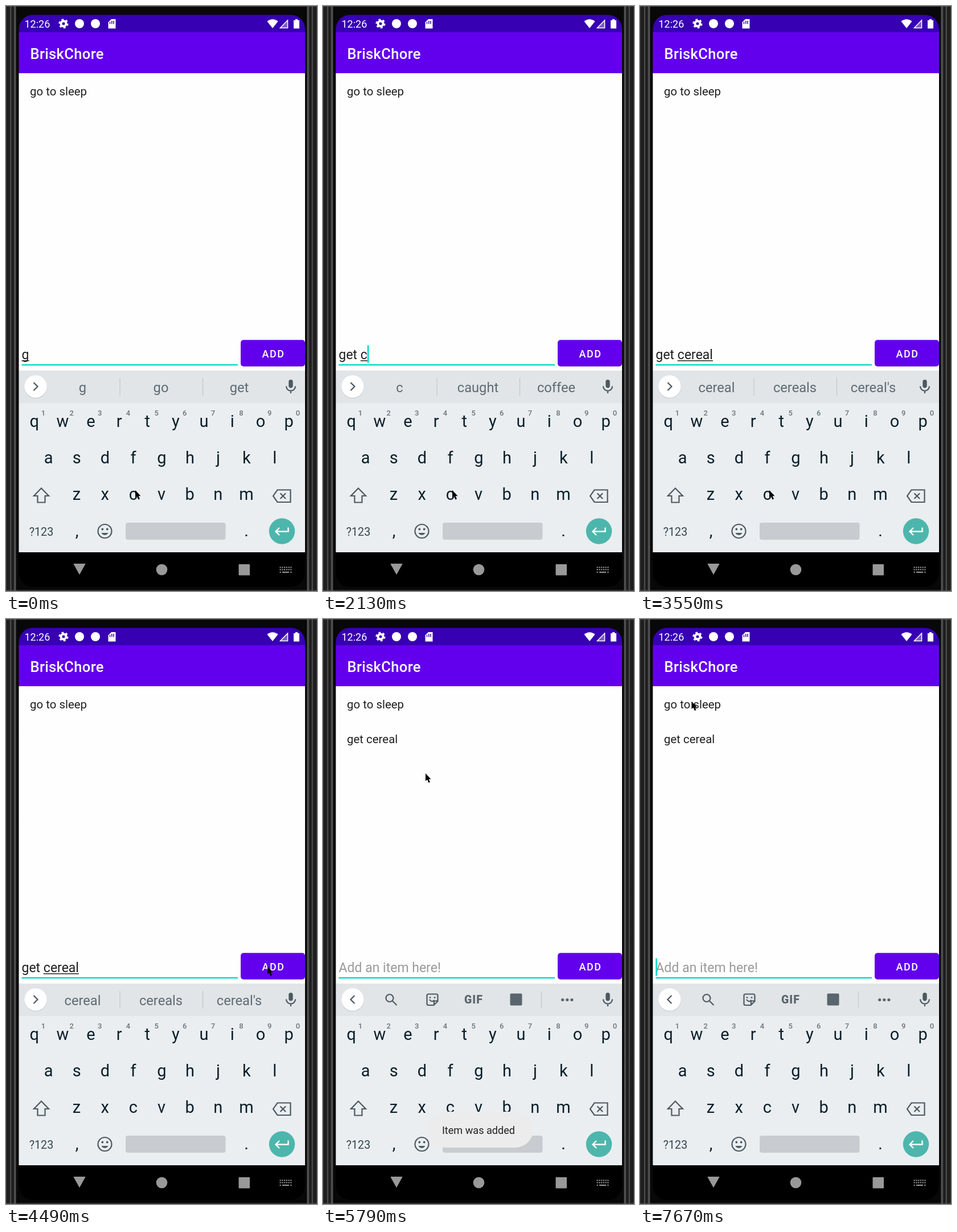
An HTML page for the animation above (8 s loop, 546x1027 px).

```html
<!DOCTYPE html>
<html lang="en">
<head>
<meta charset="utf-8">
<title>To-do list</title>
<style>
  html, body { margin: 0; width: 100%; height: 100%; overflow: hidden; background: #000; }
  svg { display: block; width: 100%; height: 100%; }
  text { font-family: Roboto, sans-serif; white-space: pre; }
  .mid { text-anchor: middle; }
  .line { fill: none; stroke: #4d5960; stroke-width: 2.2; }
</style>
</head>
<body>
<svg viewBox="0 0 546 1027">
  <defs>
    <linearGradient id="edge">
      <stop offset="0" stop-color="#444"/><stop offset=".08" stop-color="#1c1c1c"/>
      <stop offset=".34" stop-color="#222"/><stop offset=".42" stop-color="#5c5c5c"/>
      <stop offset=".5" stop-color="#161616"/><stop offset=".7" stop-color="#2a2a2a"/>
      <stop offset=".8" stop-color="#6a6a6a"/><stop offset=".9" stop-color="#111"/>
      <stop offset="1" stop-color="#050505"/>
    </linearGradient>
    <clipPath id="screen"><rect x="22.5" y="15.4" width="502.5" height="1004.6" rx="25"/></clipPath>
    <clipPath id="button"><rect x="412" y="586.300" width="113" height="46.500" rx="5"/></clipPath>
  </defs>

  <!-- phone body -->
  <rect width="546" height="1027" fill="#080808"/>
  <rect id="side" width="20" height="1027" fill="url(#edge)"/>
  <use href="#side" transform="translate(546) scale(-1 1)"/>
  <path d="M0 .7H546M0 1026H546" stroke="#555"/>

  <g clip-path="url(#screen)">
    <rect x="22" y="15" width="504" height="1005"/>
    <rect x="22" y="15" width="504" height="31" fill="#3700b3"/>
    <rect x="22" y="46" width="504" height="72" fill="#6200ee"/>
    <rect x="22" y="118" width="504" height="522" fill="#fefefe"/>
    <rect x="22" y="640" width="504" height="57" fill="#e1e5e8"/>
    <rect x="22" y="697" width="504" height="262" fill="#eaeef1"/>
  </g>

  <!-- status bar -->
  <g fill="#fff">
    <text x="32.500" y="38" font-size="18">12:26</text>
    <circle cx="101" cy="31" r="4.500" fill="none" stroke="#fff" stroke-width="4"/>
    <circle cx="101" cy="31" r="7.300" fill="none" stroke="#fff" stroke-width="2.500" stroke-dasharray="3.820"/>
    <circle cx="129" cy="31" r="8"/>
    <circle cx="157" cy="31" r="8"/>
    <path d="M185 23h7.500v16.500h-13V28.500z"/>
    <path d="M182.500 28v3.500M185.800 26v5.500M189 26v5.500" stroke="#3700b3" stroke-width="1.500"/>
    <path d="M458.500 27Q468 19.500 477.500 27L468 39z"/>
    <path d="M480.500 39L495 24V39z" opacity=".35"/>
    <path d="M481.500 38.500L494.500 25V38.500z" fill="none" stroke="#fff" stroke-width="1.500"/>
    <path d="M505 25h3v-2h4v2h3v14.500h-10z"/>
    <text x="42.500" y="92.500" font-size="25.560" font-weight="500" letter-spacing=".32">BriskChore</text>
  </g>

  <!-- list and input row -->
  <g fill="#202020" font-size="20.450">
    <text x="42" y="157">go to sleep</text>
    <text x="42" y="218.300" id="newItem">get cereal</text>
  </g>
  <rect x="27.500" y="628.800" width="379.500" height="2.400" fill="#03dac5"/>
  <text id="input" x="27.500" y="620" font-size="23"></text>
  <rect id="underline" y="622" height="1.500" fill="#222"/>
  <rect id="caret" y="595.500" width="2.600" height="31" fill="#03dac5"/>
  <g clip-path="url(#button)">
    <rect x="412" y="586" width="113" height="48" fill="#6200ee"/>
    <circle id="ripple" cx="456" cy="613" fill="#fff" opacity=".2"/>
  </g>
  <text class="mid" x="469.500" y="616.500" font-size="17.900" font-weight="500" letter-spacing="1.600" fill="#fff">ADD</text>

  <!-- suggestion strip -->
  <circle cx="52" cy="669" r="20" fill="#c9cdd0"/>
  <circle cx="52" cy="668" r="19.700" fill="#fff"/>
  <path id="chevron" class="line" d="M48.500 661l7 7l-7 7"/>
  <rect x="496.300" y="656" width="7.400" height="14.500" rx="3.700" fill="#4d5960"/>
  <path class="line" d="M492 667.500a8 8 0 0 0 16 0M500 675.500v4.500"/>
  <g id="words" class="mid" font-size="23.700" fill="#5f6b72">
    <path d="M200 653v31M345.500 653v31" stroke="#c2c7cb" stroke-width="1.200"/>
    <text x="134.500" y="678"></text><text x="272" y="678"></text><text x="409.500" y="678"></text>
  </g>
  <g id="tools" fill="#5a666d">
    <circle cx="117" cy="665.500" r="6.500" class="line"/>
    <path class="line" d="M122 670.500l7.500 7.500"/>
    <path class="line" d="M185 658.500h14q2.500 0 2.500 2.500v10l-7 7h-9.500q-2.500 0-2.500-2.500v-14.500q0-2.500 2.500-2.500zM201.500 670.500h-6.500v7.500M187 668q4 6 8.500 1"/>
    <circle cx="188" cy="664.500" r="1.500"/><circle cx="196" cy="664.500" r="1.500"/>
    <text class="mid" x="264.500" y="675" font-size="19.500" font-weight="800" letter-spacing="1">GIF</text>
    <rect x="328.500" y="657.500" width="21" height="21" rx="2"/>
    <path d="M383.500 654v29" stroke="#c2c7cb" stroke-width="1.200"/>
    <circle cx="420.700" cy="668.500" r="2.600"/><circle cx="428.800" cy="668.500" r="2.600"/><circle cx="436.900" cy="668.500" r="2.600"/>
  </g>

  <!-- keyboard -->
  <g id="keys" class="mid" font-size="29" fill="#0b1f2a"></g>
  <path class="line" d="M62 846.500L49 860h6.500v11.500h13V860h6.500z"/>
  <path class="line" d="M476.500 849.500H499.500V871H476.500L469 860.200zM481.500 855.500l9.500 9.500M491 855.500l-9.500 9.500"/>
  <text class="mid" x="62" y="929.500" font-size="19.800" fill="#37464e">?123</text>
  <circle cx="173.500" cy="922" r="12" class="line"/>
  <path d="M167.500 925a6.500 6 0 0 0 12 0z" fill="#4d5960"/>
  <circle cx="169.300" cy="918.500" r="1.900" fill="#4d5960"/><circle cx="177.700" cy="918.500" r="1.900" fill="#4d5960"/>
  <rect x="210" y="907" width="175.500" height="30" rx="4" fill="#c8ccd0"/>
  <circle cx="484.500" cy="922" r="22.700" fill="#4db6ac"/>
  <path d="M495.500 915.500v7H474M480 916l-6.500 6.500l6.500 6.500" fill="none" stroke="#fff" stroke-width="2.400"/>

  <!-- navigation bar -->
  <g fill="#999">
    <path d="M119 979.500h20l-10 18z" stroke="#999" stroke-linejoin="round"/>
    <circle cx="273.500" cy="989.500" r="9.800"/>
    <rect x="408.500" y="980" width="19.500" height="19.500" rx="1"/>
    <path d="M480.500 985.500h21M480.500 989.500h21" stroke="#999" stroke-width="2.200" stroke-dasharray="2.300 1.440"/>
    <path d="M480.500 994h2.300M485 994h12M499.200 994h2.300" stroke="#999" stroke-width="2.200"/>
  </g>

  <g id="toast">
    <rect x="182" y="865" width="187" height="63" rx="31.500" fill="#ececec"/>
    <text class="mid" x="273" y="904" font-size="18.100" fill="#222">Item was added</text>
  </g>
  <path id="mouse" d="M0 0V13.500L3 11L5.500 16.500L8 15.300L5.600 10.200H9.500z"/>
</svg>
<script>
const $ = id => document.getElementById(id);
const LOOP = 8000, INPUT_X = 27.5, ADDED = 4870, TOOLBAR = 5230;

// Each track lists [start time, ...values]; a value holds until the next start.
const typing = [
  [0, 'g', 'g', 'go', 'get'],
  [660, 'get', 'get', 'got', 'gets'],
  [800, 'get ', 'a', 'to', 'the'],
  [2130, 'get c', 'c', 'caught', 'coffee'],
  [2410, 'get ce', 'ce', 'certain', 'cell'],
  [2600, 'get cere', 'cere', 'cereal', 'cerebral'],
  [2780, 'get cerea', 'cerea', 'cereal', 'cereals'],
  [3090, 'get cereal', 'cereal', 'cereals', "cereal's"],
  [ADDED, '']
];
const caretFlips = [370, 1260, 1700, 3550, 3940, 4490, 4870, 5360, 5800, 6210, 6760, 7160, 7670];
const pointer = [
  [0, 227, 850], [3810, 236, 842], [3940, 300, 788], [4080, 395, 700], [4210, 458, 636],
  [4350, 471, 612], [4490, 459, 610], [4610, 456, 613], [4740, 453, 619], [4870, 452, 621],
  [5230, 430, 606], [5360, 345, 545], [5540, 239, 453], [5670, 180, 271], [5800, 153, 262],
  [5940, 86, 248], [6070, 91, 228], [6210, 98, 211], [6340, 99.5, 205],
  [7020, 97, 190], [7160, 93, 162], [7290, 91, 147], [7420, 90.5, 144.5]
];
const toastFade = [[0, 0], [4870, .2], [5000, .6], [5230, 1], [6890, .6], [7020, .2], [7160, 0]];
const ripples = [[0, 0], [4610, 25], [4740, 70], [ADDED, 0]];

const at = (track, t) => track.findLast(step => step[0] <= t).slice(1);
const show = (id, on) => $(id).setAttribute('visibility', on ? 'visible' : 'hidden');
const set = (id, attrs) => { for (const k in attrs) $(id).setAttribute(k, attrs[k]); };

const ctx = document.createElement('canvas').getContext('2d');
const textWidth = s => { ctx.font = '23px Roboto, sans-serif'; return ctx.measureText(s).width; };

function keyRow(letters, x, y) {
  return [...letters].map((c, i) => `<text x="${x + i * 49.65}" y="${y}">${c}</text>`).join('');
}
$('keys').innerHTML = keyRow('qwertyuiop', 49.7, 738.6) + keyRow('asdfghjkl', 74.7, 802.7) +
  keyRow('zxcvbnm', 124, 866.8) + keyRow(',', 124.5, 931) + keyRow('.', 422, 931) +
  `<g font-size="13" font-weight="500" fill="#69747b">${keyRow('1234567890', 65.5, 718.5)}</g>`;

function draw(t) {
  const [text, ...suggestions] = at(typing, t);
  const toolbar = t >= TOOLBAR;
  const end = textWidth(text), wordStart = textWidth(text.slice(0, text.lastIndexOf(' ') + 1));

  $('input').textContent = text || 'Add an item here!';
  set('input', { fill: text ? '#202020' : '#9a9a9a' });
  set('underline', { x: INPUT_X + wordStart, width: end - wordStart });
  set('caret', { x: INPUT_X + end });
  show('caret', caretFlips.filter(f => f <= t).length % 2);
  show('newItem', t >= ADDED);

  show('words', t < ADDED);
  show('tools', toolbar);
  $('words').querySelectorAll('text').forEach((el, i) => el.textContent = suggestions[i] || '');
  set('chevron', { transform: toolbar ? 'translate(104) scale(-1 1)' : '' });

  set('ripple', { r: at(ripples, t)[0] });
  set('toast', { opacity: at(toastFade, t)[0] });
  set('mouse', { transform: `translate(${at(pointer, t)})` });
}

const start = performance.now();
function tick() {
  draw((performance.now() - start) % LOOP);
  requestAnimationFrame(tick);
}
tick();
</script>
</body>
</html>
```
